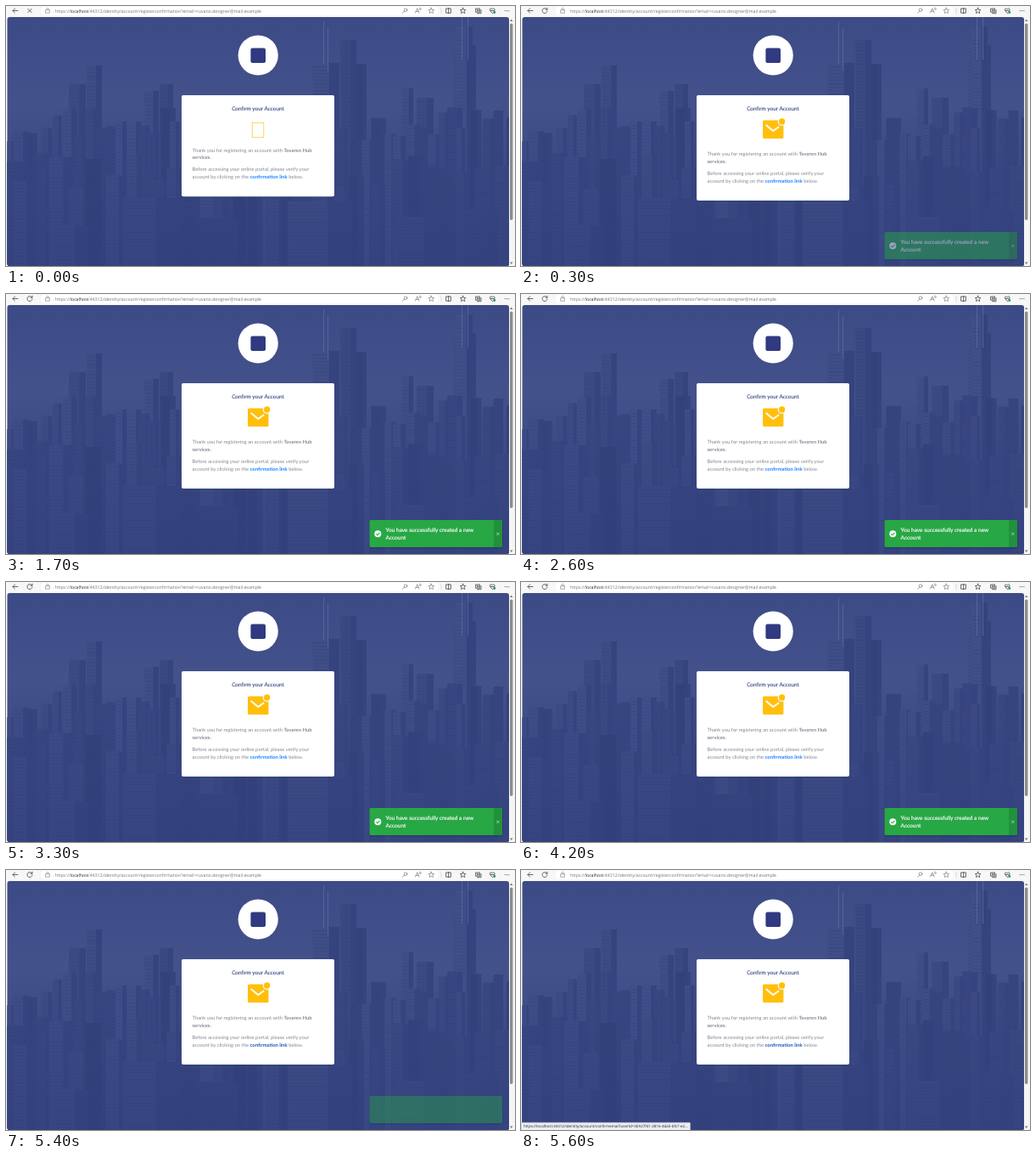
Write an HTML page that moves like this. It is 600 px wide and 306 px high and loops after 5.7 s.

```html
<!DOCTYPE html>
<html lang="en">
<head>
<meta charset="utf-8">
<title>Confirm your Account</title>
<style>
html, body { margin: 0; width: 100%; height: 100%; overflow: hidden; background: #f7f7f7; }
svg { display: block; width: 100%; height: 100%; }
text { font: 5.87px Lato, sans-serif; text-rendering: geometricPrecision; fill: #858796; }
.url { font: 5.2px "Open Sans", sans-serif; fill: #707070; }
.host { fill: #222; }
.b { font-weight: 700; }
.title { font-size: 6.45px; fill: #3a4a86; stroke: #3a4a86; stroke-width: .12; text-anchor: middle; }
.toast { font-size: 6.55px; fill: #fff; stroke: #fff; stroke-width: .15; }
.status { font: 4.49px "Open Sans", sans-serif; fill: #222; }
.line { fill: none; stroke: #444; stroke-width: .8; stroke-linecap: round; stroke-linejoin: round; }
</style>
</head>
<body>
<svg viewBox="0 0 600 306">
  <defs>
    <linearGradient id="sky" x2="0" y2="1">
      <stop offset="0" stop-color="#3c4b86"/>
      <stop offset=".35" stop-color="#43528b"/>
      <stop offset="1" stop-color="#33427e"/>
    </linearGradient>
    <linearGradient id="haze" x2="0" y2="1">
      <stop offset="0" stop-color="#3b4a86" stop-opacity="0"/>
      <stop offset="1" stop-color="#303f7c" stop-opacity=".45"/>
    </linearGradient>
    <clipPath id="page"><rect x="1.5" y="13" width="591.5" height="293" rx="3"/></clipPath>
    <path id="star" d="M0-3.3L1-1.1 3.3-.9 1.6.7 2.1 3 0 1.8-2.1 3-1.6.7-3.3-.9-1-1.1Z"/>
  </defs>

  <!-- browser bar -->
  <rect width="600" height="306" fill="#f7f7f7"/>
  <rect x="41" y=".5" width="469" height="10.5" rx="5" fill="#fff"/>
  <g class="line">
    <path d="M14 5.5H8M10.6 2.8L8 5.5 10.6 8.2"/>
    <path id="stop" d="M25.8 3.3L30.2 7.7M30.2 3.3L25.8 7.7"/>
    <path id="reload" d="M30.6 4A3 3 0 1 0 31 6M31 2.2V4.2H29"/>
    <path d="M47 4.8H51.4V8.2H47ZM48 4.6V3.6A1.2 1.2 0 0 1 50.4 3.6V4.6" stroke="#777" stroke-width=".6"/>
    <g stroke="#666" stroke-width=".6">
      <circle cx="471" cy="4.7" r="1.9"/><path d="M469.7 6.2L467.5 8.4"/>
      <path d="M482.5 8L484.8 2.8 487 8M483.3 6.3H486.3M487.5 2.5Q488.5 3.3 487.5 4.3M488.7 2Q490 3.3 488.7 4.8"/>
      <use href="#star" x="501.3" y="5.5"/>
      <path d="M513 2.5V8.5" stroke="#ccc"/>
    </g>
    <path d="M519 3H524.4V8.2H519ZM521.7 2.4V8.8"/>
    <use href="#star" x="538.6" y="5.5"/>
    <path d="M554 3H558.5V7.2H554ZM555.5 8.7H560V4.6M556.2 4V6.3M555 5.1H557.5"/>
    <path d="M573.3 8.5L570.6 5.6Q569.8 3 571.9 2.7L573.3 3.8 574.7 2.7Q576.8 3 576 5.6ZM571.5 5.5H575"/>
    <circle cx="575.8" cy="7.5" r="1.4" fill="#2f9e4f" stroke="none"/>
    <path d="M588.3 5.6h0M590.6 5.6h0M592.9 5.6h0" stroke-width="1.1"/>
  </g>
  <text class="url" x="58" y="7.6">https://<tspan class="host">localhost</tspan>:44312/identity/account/registerconfirmation?email=ruvano.designer@mail.example</text>

  <!-- page -->
  <g clip-path="url(#page)">
    <rect y="13" width="600" height="293" fill="url(#sky)"/>
    <g id="city"></g>
    <rect y="100" width="600" height="206" fill="url(#haze)"/>
  </g>
  <rect x="593" y="13" width="7" height="293" fill="#f5f5f5"/>
  <rect x="594" y="20.5" width="3.4" height="231.5" rx="1.7" fill="#8b8b8b"/>
  <path d="M594 18L595.7 15.4 597.4 18ZM594 301.5L595.7 304 597.4 301.5Z" fill="#777"/>

  <circle cx="297.2" cy="58" r="23.6" fill="#fff"/>
  <rect x="288.4" y="49.4" width="17.6" height="17.6" rx="2" fill="#2f3a80"/>

  <rect x="207" y="106" width="180" height="124" rx="2" fill="#1b2858" opacity=".25" id="shade"/>
  <rect id="card" x="207" y="105" width="180" height="124" rx="2" fill="#fff"/>
  <text class="title" x="297" y="123.3">Confirm your Account</text>
  <rect id="box" x="290.2" y="137.3" width="13.6" height="17.4" fill="none" stroke="#ffc93c" stroke-width=".8"/>
  <g id="mail">
    <rect x="285" y="134.5" width="24.4" height="21.6" rx="1.6" fill="#ffbf0b"/>
    <path d="M288.5 139.7L297.2 147 304.2 142" fill="none" stroke="#fff" stroke-width="1.9"/>
    <circle cx="307.6" cy="136" r="4.9" fill="#fff"/>
    <circle cx="307.6" cy="136" r="3.7" fill="#ffbf0b"/>
  </g>
  <g id="copy">
    <text x="219.5" y="176.4">Thank you for registering an account with <tspan class="b">Tovaren Hub</tspan></text>
    <text x="219.5" y="184.9" class="b">services.</text>
    <text x="219.5" y="199.3">Before accessing your online portal, please verify your</text>
    <text x="219.5" y="207.8">account by clicking on the <tspan id="link" class="b">confirmation link</tspan> below.</text>
  </g>

  <g id="toast">
    <rect x="427.8" y="266" width="158" height="33.5" rx="2" fill="#17244f" opacity=".3"/>
    <rect x="428.5" y="266" width="156.5" height="32" rx="1.5" fill="#28a745"/>
    <g id="note">
      <rect x="575" y="266" width="10" height="32" fill="#22913c"/>
      <circle cx="438.3" cy="282.2" r="4" fill="#fff"/>
      <path d="M436.3 282.3L437.8 283.8 440.5 280.9" fill="none" stroke="#28a745" stroke-width="1.1"/>
      <text class="toast" x="447.6" y="279.7">You have successfully created a new</text>
      <text class="toast" x="447.6" y="289.2">Account</text>
      <path d="M578.3 280.8L581.3 283.8M581.3 280.8L578.3 283.8" stroke="#c9ead0" stroke-width=".7"/>
    </g>
  </g>

  <g id="status">
    <rect x=".5" y="297.2" width="199" height="9.5" rx="1" fill="#eceef1" stroke="#b5b8c0" stroke-width=".5"/>
    <text class="status" x="3" y="303.4">https://localhost:44312/identity/account/confirmemail?userId=3b927f41-2816-4da5-bfc7-e2…</text>
  </g>
</svg>
<script>
const $ = id => document.getElementById(id);
const LOOP = 5700;

let seed = 11;
const rnd = (a = 0, b = 1) => {
  seed = (seed * 16807) % 2147483647;
  return a + (b - a) * seed / 2147483647;
};
const rect = (x, y, w, h, fill, alpha = 1) =>
  `<rect x="${x.toFixed(1)}" y="${y.toFixed(1)}" width="${w.toFixed(1)}" height="${h.toFixed(1)}" fill="${fill}" opacity="${alpha.toFixed(2)}"/>`;

// One block: lit face, shaded side, rows of windows
function building(x, y, w, tone) {
  const h = 306 - y, lit = w * .62;
  const face = `rgb(${58 + tone},${72 + tone},${130 + tone})`;
  let s = rect(x, y, w, h, "#35447f") + rect(x, y, lit, h, face, .8);
  for (let r = y + 4; r < Math.min(306, y + 110); r += 4)
    s += rect(x + 1.5, r, lit - 3, 1.2, "#2e3d78", rnd(.1, .45));
  return s;
}

function skyline() {
  let s = "";
  // x, top, width, tone
  const towers = [
    [74, 92, 20, 4], [95, 70, 18, 6], [163, 100, 17, 8], [181, 92, 16, 2],
    [361, 67, 32, 8], [394, 40, 19, 2], [413, 68, 12, -6], [466, 97, 14, 8],
    [484, 108, 20, 4], [527, 46, 27, 8], [531, 24, 19, 10]
  ];
  for (const b of towers) s += building(...b);
  for (const [x, y] of [[374, 18], [379, 26], [537, 13], [544, 13]])
    s += rect(x, y, .8, 50, "#6575a8", .7);
  for (let x = -4; x < 600; x += rnd(9, 17))
    s += building(x, rnd(118, 160), rnd(10, 21), rnd(-8, 10));
  for (let x = -8; x < 600; x += rnd(15, 27))
    s += building(x, rnd(170, 220), rnd(16, 30), rnd(-10, 10));
  const front = [[138, 226, 62, 3], [225, 250, 48, -4], [332, 230, 76, 6], [462, 248, 50, 2], [55, 258, 42, 4], [540, 240, 40, -2]];
  for (const b of front) s += building(...b);
  return s;
}
$("city").innerHTML = skyline();

const clamp = v => Math.max(0, Math.min(1, v));
const show = (id, on) => $(id).style.display = on ? "" : "none";

function draw(t) {
  const loaded = t >= 100, hover = t >= 5100;
  show("stop", !loaded);
  show("reload", loaded);
  show("box", !loaded);
  show("mail", loaded);
  $("card").setAttribute("height", loaded ? 124 : 119.2);
  $("shade").setAttribute("height", loaded ? 124 : 119.2);
  $("copy").setAttribute("transform", `translate(0 ${loaded ? 0 : -4.8})`);
  $("link").style.fill = hover ? "#1f5bb5" : "#1a86ff";

  const fadeIn = clamp((t - 100) / 400), fadeOut = clamp((5550 - t) / 350);
  $("toast").style.opacity = Math.min(fadeIn, fadeOut);
  $("note").style.opacity = clamp(1 - (t - 5050) / 230);
  show("status", t >= 5500);
}

function frame(now) {
  draw(Math.floor(now % LOOP / 100) * 100);
  requestAnimationFrame(frame);
}
draw(0);
requestAnimationFrame(frame);
</script>
</body>
</html>
```
